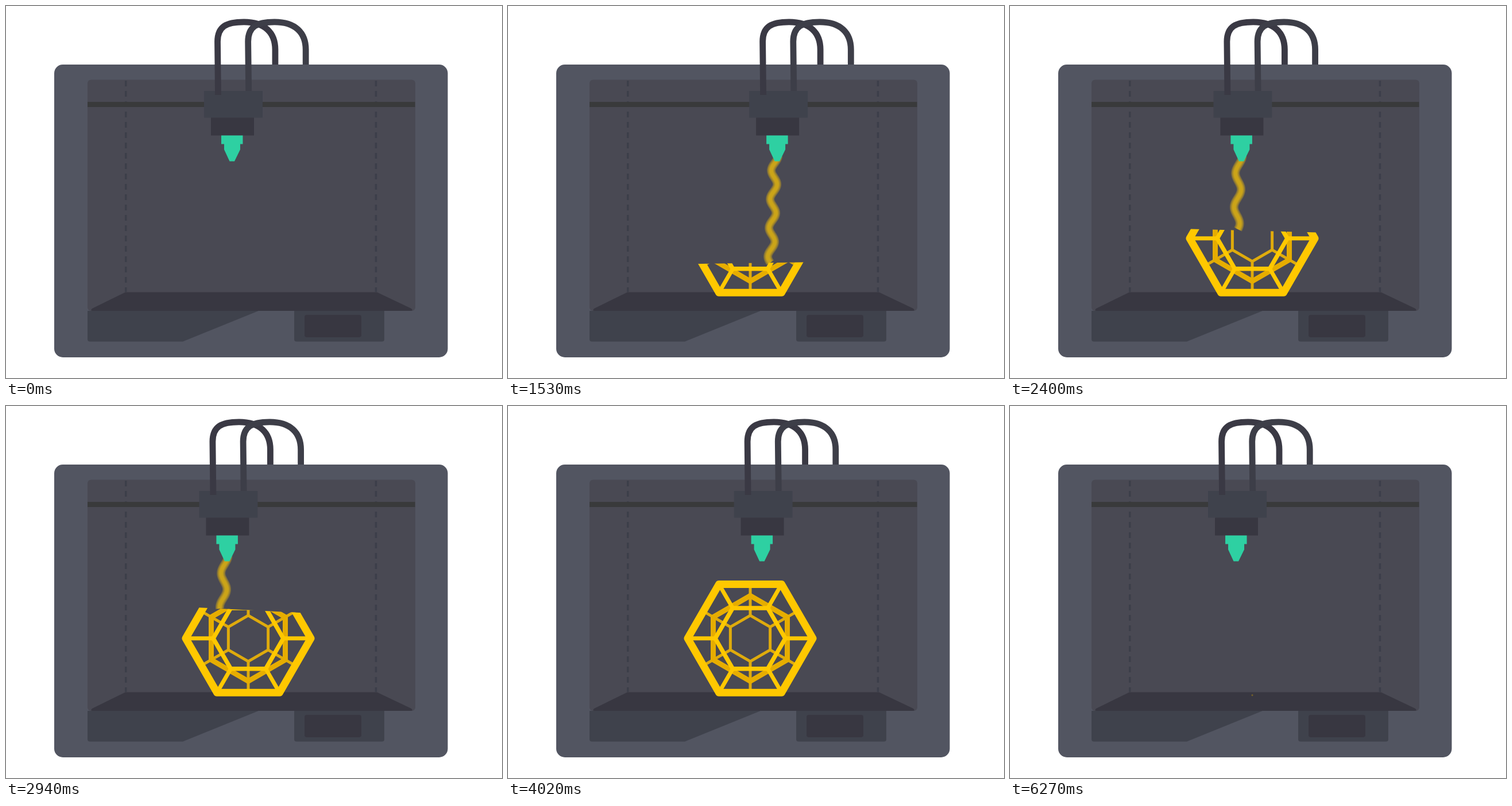
An HTML page with a canvas that plays this animation: 864x648 px, repeating every 6300 ms.

```html
<!DOCTYPE html>
<html lang="en">
<head>
<meta charset="utf-8">
<title>3D printer</title>
<style>
html, body { margin: 0; width: 100%; height: 100%; overflow: hidden; background: #fff; }
canvas { display: block; }
</style>
</head>
<body>
<canvas id="stage" width="864" height="648"></canvas>
<script>
const ctx = document.getElementById('stage').getContext('2d');
const LOOP = 6300, STEP = 30, START = 60, HOME = 4200, SWEEP = 279;
const CX = 422, CY = 404.8, BASE = 505, TIP = 261;
const WINDOW = '#494953', BODY = '#525561', DARK = '#383741', SLATE = '#3f424c';

// Steady sweeps that ease in at the start and hurry home at the end;
// their reach follows the width of the model at the printed height.
function printState(t) {
  t = Math.min(Math.max(t, START), HOME);
  const sweeps = (t - START) / SWEEP;
  const lead = 2.247 * Math.exp((START - t) / 475);
  const rush = 0.903 * Math.exp((t - HOME) / 183);
  const y = 548 - 18.64 * sweeps - 20 * lead;
  const reach = 112 - 0.45 * Math.abs(y - 385);
  const wave = Math.cos(Math.PI * (sweeps + lead + rush));
  return { dx: 42 - reach * wave, y, tilt: Math.min(0.1, (t / 8000) ** 2) * wave };
}

function box(x, y, w, h, color, r = 0) {
  ctx.fillStyle = color;
  ctx.beginPath();
  ctx.roundRect(x, y, w, h, r);
  ctx.fill();
}

function shape(path, color) {
  ctx.fillStyle = color;
  ctx.fill(new Path2D(path));
}

function line(path, color, width) {
  ctx.strokeStyle = color;
  ctx.lineWidth = width;
  ctx.stroke(new Path2D(path));
}

function machine() {
  box(84, 102, 685.5, 510, BODY, 15);
  box(142, 128.5, 571, 402.5, WINDOW, 6);
  ctx.setLineDash([10, 8]);
  line('M208.8 130V498M644.5 130V498', '#3c3f4a', 3.5);
  ctx.setLineDash([]);
  box(142, 167, 570.5, 9, '#393a3b');
  shape('M142 531H440L308 584.5H146Q142 584.5 142 580Z', SLATE);
  box(502, 531, 157, 53.5, SLATE, [0, 0, 4, 4]);
  box(520, 538, 99, 39, DARK, 4);
  shape('M208 498.5H646L706 527Q710 531 705 531H151Q146 531 150 527Z', DARK);
}

function hose(x, foot, color) {
  ctx.save();
  ctx.translate(x, 0);
  line(`M1 ${foot}L0 62C0 36 15 27.8 46 27.8C82 27.8 100.5 46 100.5 76V102`, color, 10.8);
  ctx.restore();
}

function head(dx) {
  ctx.save();
  ctx.translate(dx, 0);
  box(345, 148, 102, 46.5, SLATE);
  box(357, 194.5, 75, 31, DARK);
  box(375, 225.5, 37.5, 15, '#2ed0a2');
  shape('M380 240H408V250L398 270.5H389.5L380 250Z', '#2ed0a2');
  hose(368.5, 155, '#3a3944');
  hose(421.7, 148, '#3d3e48');
  ctx.restore();
}

// Corner i of a hexagon; turn 0 is flat-topped, 0.5 is pointed
function corner(r, i, turn) {
  const a = (i + turn) * Math.PI / 3;
  return (CX + r * Math.cos(a)).toFixed(2) + ' ' + (CY + r * Math.sin(a)).toFixed(2);
}

const SIDES = [0, 1, 2, 3, 4, 5];
const hex = (r, turn) => 'M' + SIDES.map(i => corner(r, i, turn)).join('L') + 'Z';
const spokes = (r1, r2, turn) =>
  SIDES.map(i => 'M' + corner(r1, i, turn) + 'L' + corner(r2, i, turn)).join('');

function model(front, middle, back) {
  ctx.lineJoin = 'round';
  line(spokes(40, 94, 0.5), back, 5);
  line(hex(40, 0.5), back, 5);
  line(hex(74.5, 0.5), middle, 9);
  line(spokes(61, 109, 0), front, 7);
  line(hex(61, 0), front, 7.5);
  line(hex(109, 0), front, 13);
  ctx.lineJoin = 'miter';
}

const solid = () => model('#ffc800', '#e6ad00', '#dfab0c');

function printing({ y, tilt }) {
  const edge = x => y + tilt * (x - CX);
  ctx.save();
  ctx.beginPath();
  ctx.moveTo(290, edge(290));
  ctx.lineTo(555, edge(555));
  ctx.lineTo(555, 520);
  ctx.lineTo(290, 520);
  ctx.clip();
  solid();
  ctx.restore();
}

function filament(t, { dx, y, tilt }) {
  const x0 = 390 + dx;
  const end = Math.min(y + tilt * (x0 - CX), TIP + (t - 30) * 1.6, 500);
  if (end < 298) return;
  const length = 60 + 10 * Math.cos(2 * Math.PI * (t - 960) / 1140);
  let path = '';
  for (let py = TIP; py <= end; py += 2) {
    const x = x0 + 5.5 * Math.cos(2 * Math.PI * (py - TIP) / length) - 0.04 * (py - TIP);
    path += (path ? 'L' : 'M') + x.toFixed(2) + ' ' + py;
  }
  // Soft edges from stacked strokes
  for (let w = 15; w > 5; w -= 3) line(path, 'rgba(255,200,0,0.27)', w);
}

function shine(t) {
  const lead = 460 + 0.87 * (t - 4645), angle = Math.atan2(0.8, 0.6);
  ctx.save();
  ctx.rotate(angle);
  ctx.beginPath();
  ctx.rect(lead - 50, -600, 50, 1200);
  ctx.rotate(-angle);
  ctx.clip();
  model('#ffe300', '#f0bd00', '#f2c808');
  ctx.restore();
}

// Swells a little, then shrinks to nothing
function modelScale(t) {
  if (t < 5280) return 1;
  if (t < 5940) return 1 + 0.034 * (1 - Math.cos(Math.PI * (t - 5280) / 660)) / 2;
  return Math.max(0, 1.034 * (1 - ((t - 5940) / 332) ** 2));
}

function finished(t) {
  const s = modelScale(t);
  ctx.save();
  ctx.translate(CX, BASE);
  ctx.scale(s, s);
  ctx.translate(-CX, -BASE);
  solid();
  if (t >= 4650 && t < 4980) shine(t);
  ctx.restore();
}

function draw(now) {
  const t = Math.floor(now % LOOP / STEP) * STEP;
  const state = printState(t);
  ctx.clearRect(0, 0, 864, 648);
  machine();
  if (t >= 4050) finished(t);
  else if (t >= START) {
    printing(state);
    filament(t, state);
  }
  head(state.dx);
}

const start = performance.now();
function tick() {
  draw(performance.now() - start);
  requestAnimationFrame(tick);
}
tick();
</script>
</body>
</html>
```
